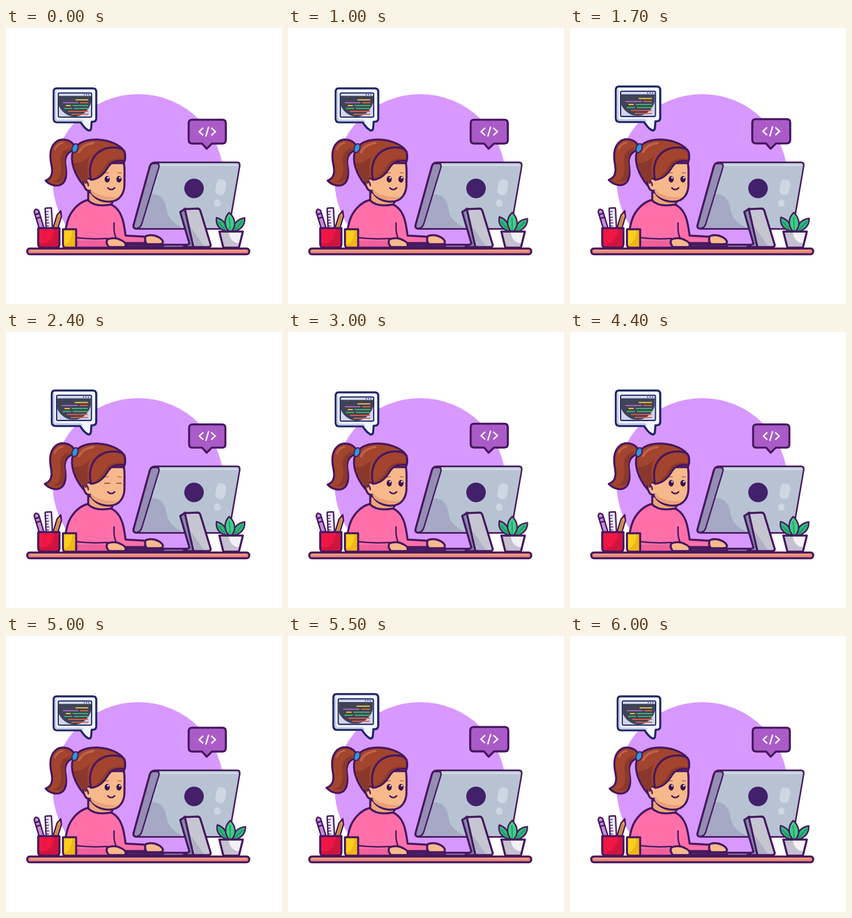
An HTML page that plays this animation: 480 px wide and 480 px high, repeating every 6.1 s.

```html
<!DOCTYPE html>
<html lang="en">
<head>
<meta charset="utf-8">
<title>Coding at the desk</title>
<style>
  html, body { margin: 0; width: 100%; height: 100%; overflow: hidden; background: #fff; }
  svg { display: block; width: 100vw; height: 100vh; }
  .ink { stroke: #45175f; stroke-width: 3.5; stroke-linejoin: round; stroke-linecap: round; }
  .thin { stroke-width: 2.5; }
  .line { fill: none; }
  .navy { stroke: #1f2765; }
</style>
</head>
<body>
<svg viewBox="0 0 480 480" xmlns="http://www.w3.org/2000/svg">
  <defs>
    <clipPath id="above"><rect width="480" height="384"/></clipPath>
    <clipPath id="panel"><path d="M267 235H402Q406 235 405 241L387 344Q386 348 382 348H233Z"/></clipPath>
    <clipPath id="pane"><rect x="92" y="119" width="56" height="35"/></clipPath>
    <clipPath id="red"><path d="M56 348H93V376Q93 382 87 382H62Q56 382 56 376Z"/></clipPath>
    <clipPath id="pot"><path d="M371 354H412L405 382H378Z"/></clipPath>
  </defs>

  <circle cx="230" cy="264" r="149" fill="#d899ff" clip-path="url(#above)"/>

  <!-- code window bubble -->
  <g id="win">
    <path class="ink navy" fill="#f3f5fd" d="M88 105H151Q157 105 157 111V157Q157 163 151 163H149L148 175Q147 179 143 178Q136 174 130 164H89Q83 164 83 158V111Q83 105 88 105Z"/>
    <path d="M86 110V157Q86 161 90 161H130L134 163" fill="none" stroke="#c4cae8" stroke-width="3"/>
    <rect class="navy" x="91" y="113" width="58" height="42" rx="2" fill="#d0d6ee" stroke-width="2"/>
    <path d="M92 119H148" stroke="#1f2765" stroke-width="1.5"/>
    <g fill="#1f2765"><circle cx="136" cy="116" r="1"/><circle cx="140" cy="116" r="1"/><circle cx="144" cy="116" r="1"/></g>
    <ellipse cx="119" cy="121" rx="30" ry="33" fill="#3f4354" clip-path="url(#pane)"/>
    <g id="code" stroke-width="2"></g>
  </g>

  <!-- tag bubble -->
  <g id="tag">
    <path class="ink" fill="#aa5bc8" d="M324 160H376Q382 160 382 166V195Q382 201 376 201H358L349 210L341 201H324Q318 201 318 195V166Q318 160 324 160Z"/>
    <path d="M343 174L336 180.500L343 187M357 174L364 180.500L357 187M352.500 172L347.500 189" fill="none" stroke="#fff" stroke-width="2.400"/>
  </g>

  <!-- girl -->
  <g id="tail">
    <path class="ink" fill="#a3442f" d="M118 203C110 193 95 191 86 199C75 209 76 224 79 238C82 252 80 261 69 265.500C76 273 90 278 99 270C107 262 105 247 103 236C102 224 106 217 116 213Z"/>
    <path d="M81 267C94 267 98 252 95 234C93 220 100 210 114 208C105 216 101 224 103 238C106 256 103 274 81 267Z" fill="#8a382c"/>
    <path d="M85 211Q89 201 98 200" fill="none" stroke="#c06348" stroke-width="3" stroke-linecap="round"/>
  </g>

  <path class="ink" fill="#ff70a9" d="M142 299C125 304 112 319 107 336C103 350 101 366 101 382H178L177 367L206 374L242 374L243 363L208 361C205 338 202 318 185 308Z"/>
  <path d="M103 370H176V380H103Z" fill="#f0609b"/>
  <path class="ink thin line" d="M118 364Q145 368 176 366M188 339Q187 356 191 364"/>
  <path class="ink" fill="#ee a57b" style="fill:#eea57b" d="M143 285V300Q155 312 183 307L188 297Z"/>
  <path class="ink" fill="#a3442f" d="M140 279C123 262 113 240 115 221C117 202 137 193 159 194C181 195 200 204 206 215C208 222 208 232 203 237L149 270Z"/>
  <path class="ink" fill="#f7b98c" d="M147 263C136 258 132 267 136 275C138 281 142 284 147 283C151 295 164 302 179 302C199 302 207 286 206 268C206 254 207 246 205 235L170 235Z"/>
  <path d="M148 281C158 292 178 295 196 294C181 304 152 299 147 284Z" fill="#eca17a"/>
  <path class="ink" fill="#a3442f" d="M148 264C142 240 150 218 172 210C186 206 201 207 206 215Q208 224 206 231C193 230 184 232 178 241C170 255 161 263 148 264Z"/>
  <path d="M150 261C158 261 166 250 171 241C180 226 193 226 204 228C191 228 182 231 176 240C169 253 161 261 150 261Z" fill="#8a382c"/>
  <path d="M118 235C119 246 127 261 139 272Q144 264 142 250Q140 233 147 221Q133 236 118 235Z" fill="#8a382c"/>
  <path d="M127 216Q134 202 152 200" fill="none" stroke="#c06348" stroke-width="4" stroke-linecap="round"/>
  <ellipse cx="120" cy="209" rx="5" ry="8" transform="rotate(20 120 209)" fill="#2f96dc" stroke="#45175f" stroke-width="2"/>
  <path class="ink thin line" d="M139 267Q143 268 143 274M177 278Q183 284 189 278"/>
  <g id="open">
    <g fill="#35154e"><ellipse cx="176" cy="263" rx="4.500" ry="5.800"/><ellipse cx="196.500" cy="263" rx="4.500" ry="5.800"/></g>
    <g fill="#fff"><circle cx="177.500" cy="260.500" r="1.400"/><circle cx="198" cy="260.500" r="1.400"/></g>
  </g>
  <path id="shut" d="M171 263H181M192 263H201" fill="none" stroke="#79392f" stroke-width="1.500"/>
  <path d="M172 253Q176 251 179 252M194 252Q198 251 201 253" fill="none" stroke="#a45540" stroke-width="1.200"/>

  <!-- monitor -->
  <path class="ink" fill="#958db4" d="M259 234H402Q407 234 406 240L388 344Q387 349 381 349H227Q220 349 222 342L250 241Q252 234 259 234Z"/>
  <g clip-path="url(#panel)">
    <path d="M220 230H410V350H220Z" fill="#b7c3d2"/>
    <path d="M220 289H254C270 289 277 300 279 315C281 330 291 341 312 349H220Z" fill="#a5a9c4"/>
    <path d="M267 238.500H402" stroke="#d2dae5" stroke-width="3"/>
    <g fill="#cdd6e1"><rect x="365" y="263" width="17" height="28" rx="8" transform="rotate(10 374 277)"/><rect x="362" y="298" width="11" height="13" rx="5.500"/></g>
  </g>
  <path class="ink thin line" d="M256 236Q268 234 266 242L236 341Q234 347 229 348"/>
  <circle cx="327" cy="279" r="17" fill="#43206a"/>
  <path class="ink" fill="#9a9ab8" d="M210 377H314V382H210Z"/>
  <path class="ink" fill="#858aa9" d="M303 320L312 314L333 381H308L319 375Z"/>
  <path class="ink" fill="#c6c6d1" d="M311 315L334 314Q337 315 338 318L356 377Q356 381 352 381H326Z"/>
  <path d="M321 346L344 379H328Z" fill="#aeb0c4"/>

  <!-- hands -->
  <path class="ink" fill="#f7b98c" d="M176 368C184 364 194 365 200 369C207 372 210 376 207 381H179Q173 374 176 368Z"/>
  <path class="ink" fill="#f7b98c" d="M243 362C252 358 263 361 270 367C275 372 273 376 268 376H245Q240 370 243 362Z"/>
  <path class="ink thin line" d="M210 380H274M240 377V381"/>

  <!-- pens and cups -->
  <g transform="rotate(-17 57 332)">
    <path class="ink thin" fill="#c58bd8" d="M53 318Q57 311 61 318V352H53Z"/>
    <path class="ink thin line" d="M53 323H61M53 330H61"/>
  </g>
  <g transform="rotate(-3 75 332)">
    <rect class="ink thin" x="69" y="313" width="11" height="40" rx="1" fill="#eceaf5"/>
    <path d="M70 319H75M70 324H74M70 329H75M70 334H74M70 339H75M70 344H74" stroke="#45175f" stroke-width="1.300"/>
  </g>
  <g transform="rotate(17 90 335)">
    <path class="ink thin" fill="#dda04a" d="M86 326L90 317L94 326V355H86Z"/>
    <path d="M88 322L90 318L92 322Z" fill="#45175f"/>
    <path d="M90 327V353" stroke="#b97838" stroke-width="1.500"/>
  </g>
  <g clip-path="url(#red)"><path d="M55 347H94V383H55Z" fill="#ee1744"/><path d="M55 374Q81 380 84 347H94V383H55Z" fill="#cf143f"/></g>
  <path class="ink" fill="none" d="M56 348H93V376Q93 382 87 382H62Q56 382 56 376Z"/>
  <path class="ink" fill="#fccf1c" d="M99 350H122V382H104Q99 382 99 376Z"/>
  <path d="M101 376Q113 376 116 352H120V380H104Z" fill="#efb516"/>

  <!-- plant -->
  <g id="leaves" class="ink thin">
    <path fill="#2fb77a" d="M385 354C371 351 364 342 366 330C378 333 384 342 386 354Z"/>
    <path fill="#2fb77a" d="M393 354C395 340 403 332 415 330C416 342 409 350 397 354Z"/>
    <path fill="#3fcd87" d="M388 354C378 344 379 330 388 321C399 331 401 344 392 354Z"/>
    <path class="line" stroke-width="1.300" stroke="#177f5c" d="M370 338L383 353M411 336L396 353M388 330L390 353"/>
  </g>
  <g clip-path="url(#pot)"><path d="M368 352H414V384H368Z" fill="#c5c0cf"/><path d="M387 352H414V374Q389 378 387 352Z" fill="#f3f1f6"/></g>
  <path class="ink" fill="none" d="M371 354H412L405 382H378Z"/>

  <!-- desk -->
  <rect class="ink" x="37" y="383.500" width="386" height="10" rx="4.500" fill="#e88572"/>
  <path d="M43 387H417" stroke="#f3a48d" stroke-width="2" stroke-linecap="round"/>
</svg>
<script>
  const $ = id => document.getElementById(id);
  const LOOP = 6100, STEP = 100;
  const yellow = '#e8c83a', violet = '#a966c0', red = '#e05c4c', green = '#3fb573';

  // x from, x to, y, colour
  const rows = [
    [121, 143, 125, yellow],
    [99, 126, 130, violet], [129, 143, 130, red],
    [104, 113, 135, yellow], [116, 143, 135, green],
    [101, 115, 140, green], [118, 143, 140, green],
    [108, 143, 145, red],
    [114, 143, 150, red]
  ];
  $('code').innerHTML = rows.map(([a, b, y, c]) => `<path d="M${a} ${y}H${b}" stroke="${c}"/>`).join('');

  // 0 at the lag, 1 half a period later
  const wave = (t, period, lag) => (1 - Math.cos(2 * Math.PI * (t - lag) / period)) / 2;
  const zoom = (id, x, y, s) =>
    $(id).setAttribute('transform', `translate(${x} ${y}) scale(${s}) translate(${-x} ${-y})`);
  const turn = (id, x, y, a) => $(id).setAttribute('transform', `rotate(${a} ${x} ${y})`);

  function draw(t) {
    const beat = wave(t, 1000, 50);
    zoom('win', 158, 180, 1 + 0.055 * beat);
    zoom('tag', 350, 211, 0.985 + 0.05 * wave(t, 2000, 500));
    turn('tail', 117, 208, 2 * beat);
    turn('leaves', 390, 354, 4 * wave(t, 2000, 200));
    const blink = t >= 2300 && t < 2600;
    $('open').style.display = blink ? 'none' : '';
    $('shut').style.display = blink ? '' : 'none';
  }

  const start = performance.now();
  function tick() {
    const t = (performance.now() - start) % LOOP;
    draw(Math.floor(t / STEP) * STEP);
    requestAnimationFrame(tick);
  }
  tick();
</script>
</body>
</html>
```
